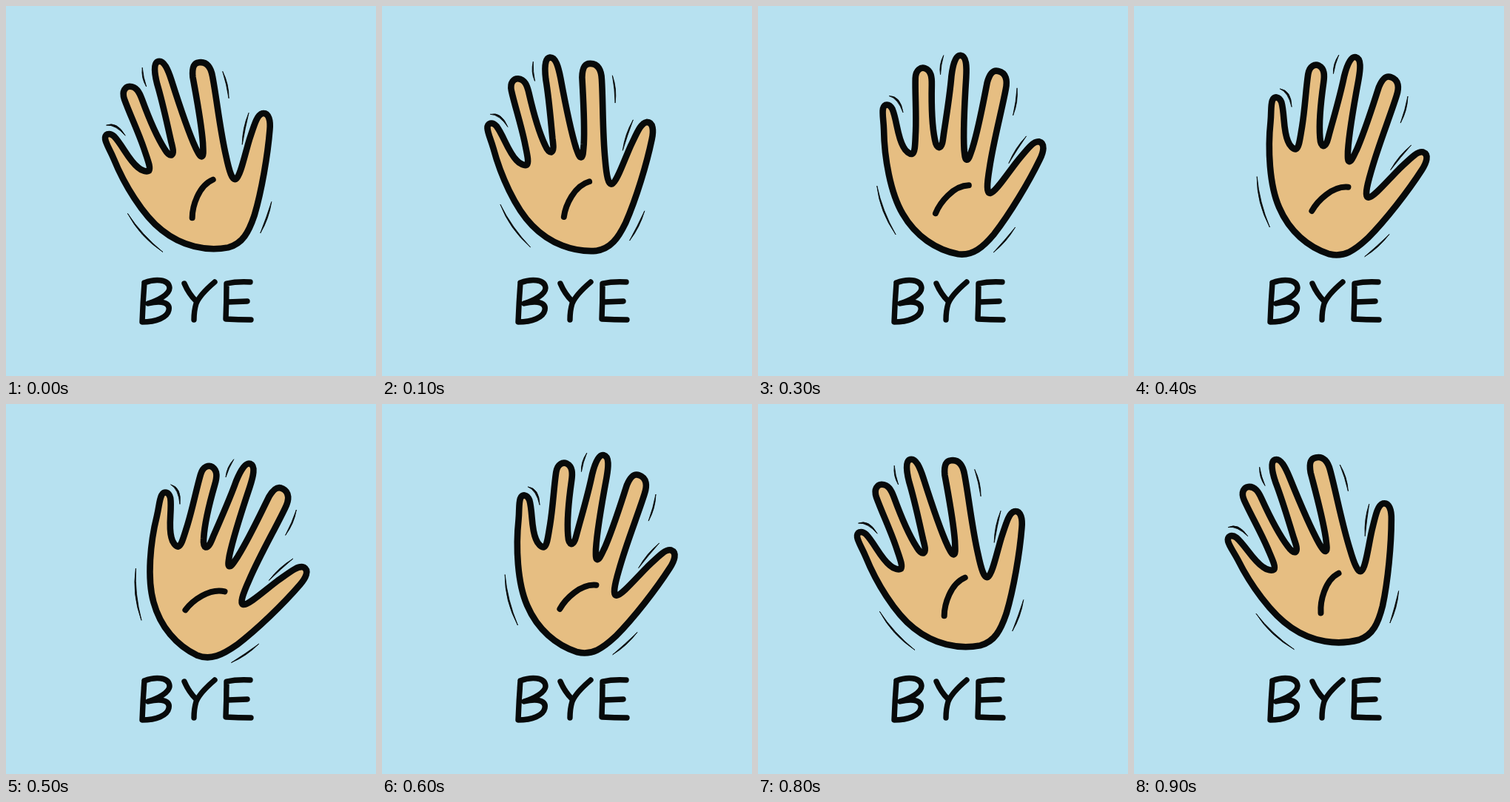
These frames come from a looping animation (500x500 px, 1000 ms). An HTML page:

```html
<!DOCTYPE html>
<html lang="en">
<head>
<meta charset="utf-8">
<title>Bye</title>
<style>
  html, body { margin: 0; width: 100%; height: 100%; overflow: hidden; background: #b7e1f0; }
  svg { display: block; width: 100%; height: 100%; }
  path { fill: none; stroke: #080a0a; stroke-linecap: round; stroke-linejoin: round; }
  .skin { fill: #e6be82; stroke-width: 8.6; }
  .crease { stroke-width: 8; }
  .swish { fill: #080a0a; stroke-width: 0.8; }
  .letters { stroke-width: 7.4; }
</style>
</head>
<body>
<svg viewBox="0 0 500 500" role="img" aria-label="A waving hand above the word BYE">
  <g id="hand">
    <path class="skin" d="M277,333
      C247,331 217,316 196,288 C176,262 162,215 157,178
      C155,165 152,157 152.5,150 C153,143 160,142 165,149
      C173,163 176,185 186,198 C190,204 196,207 199,206
      C203,203 201,190 200,175 C198,150 193,125 191,104
      C190,92 197,88 202,89 C211,91 213,100 214,110
      C217,140 221,165 227,183 C229,190 232,193 234,193
      C238,192 238,184 238,175 C239,140 240,120 239,95
      C239,80 241,66 248,66 C256,66 258,80 259,95
      C261,130 264,170 268,192 C270,201 271,205 273,205
      C276,205 277,197 279,188 C284,160 286,125 288,98
      C290,85 294,80 301,81 C312,82 315,92 314,104
      C312,135 306,175 305,212 C304,235 305,247 310,246
      C317,244 330,217 341,199 C352,182 359,169 367,169
      C376,170 375,182 371,193 C360,225 340,270 322,300
      C309,320 297,333 277,333Z"/>
    <path class="crease" d="M240,282 C244,267 259,242 280,239"/>
    <path class="swish" d="M159,132 Q174,130 180,152 Q171,134 159,132
      M225,69 Q220,82 224,95 Q223,82 225,69
      M329,101 Q333,119 328,138 Q330,119 329,101
      M349,164 Q336,181 330,203 Q339,183 349,164
      M157,255 Q165,289 190,317 Q168,287 157,255
      M349,288 Q340,309 324,325 Q337,307 349,288"/>
  </g>
  <path class="letters" d="M187,374 Q185,400 184,427
    C203,427 218,421 220,411 C222,402 212,397 192,402
    C205,398 221,390 221,381 C220,368 200,369 187,374
    M241,375 Q247,389 257,399 M282,373 Q262,390 257,402 Q254,412 254,424
    M330,373 Q312,372 298,375 Q298,400 297,423 Q314,424 331,424 M300,400 L326,399"/>
</svg>
<script>
  const STEP = 100;
  const CENTER = { x: 255.8, y: 175.1 };
  const hand = document.getElementById('hand');

  const pose = (angle, x, y) => ({ angle, x, y });
  const between = (p, q) => pose((p.angle + q.angle) / 2, (p.x + q.x) / 2, (p.y + q.y) / 2);

  // Tilt in degrees and where the centre of the hand lands
  const farLeft = pose(-18.8, 233, 176.1);
  const left = pose(-14.4, 240.4, 178.7);
  const upright = pose(0, CENTER.x, CENTER.y);
  const right = pose(13.8, 281.2, 176.9);
  const farRight = pose(21.8, 296.8, 185);

  // Slow sweep to the right, quicker return
  const wave = [
    left, between(left, upright), upright, between(upright, right), right,
    farRight, right, upright, left, farLeft
  ];

  function draw(time) {
    const { angle, x, y } = wave[Math.floor(time / STEP) % wave.length];
    hand.setAttribute('transform',
      `translate(${x} ${y}) rotate(${angle}) translate(${-CENTER.x} ${-CENTER.y})`);
  }

  let start;
  function tick(now) {
    start ??= now;
    draw(Math.max(0, now - start));
    requestAnimationFrame(tick);
  }
  draw(0);
  requestAnimationFrame(tick);
</script>
</body>
</html>
```
